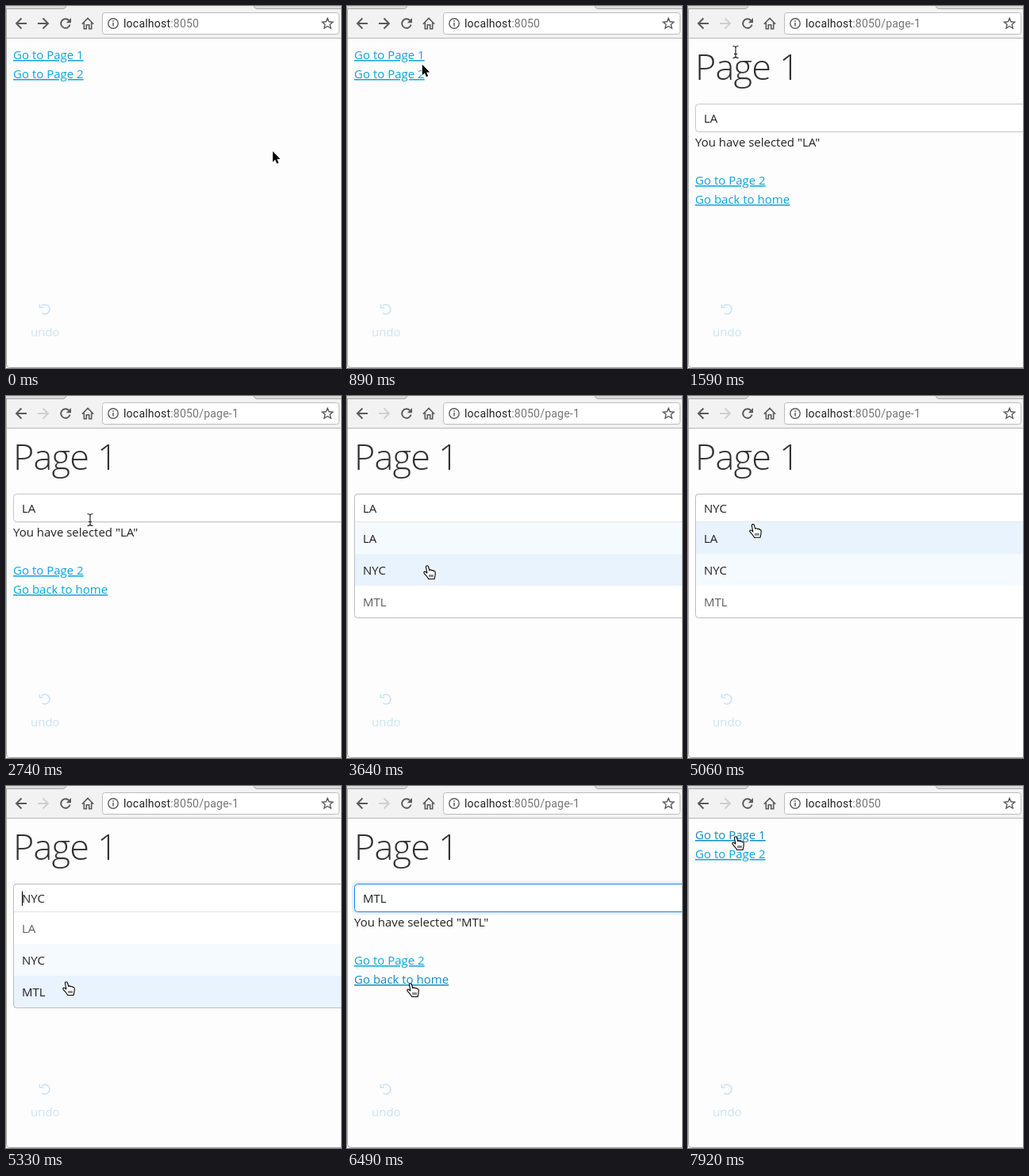
An HTML page that plays this animation: 422 by 456 pixels, repeating every 8 s.

```html
<!DOCTYPE html>
<html lang="en">
<head>
<meta charset="utf-8">
<title>Two page app</title>
<style>
html, body { margin: 0; width: 100%; height: 100%; overflow: hidden; background: #fdfdfd; }
svg { display: block; width: 422px; height: 456px; }
text { font: 15px "Open Sans", sans-serif; fill: #222; white-space: pre; }
.url { font: 14px Roboto, sans-serif; letter-spacing: .22px; }
.url .dim { fill: #757575; }
h1, .title { font-size: 45px; font-weight: 300; letter-spacing: -.8px; fill: #323232; }
.link { fill: #0ea3da; text-decoration: underline; text-decoration-skip-ink: none; }
.link.hover { fill: #0d8dc4; }
.icon { fill: none; stroke: #5a5a5a; stroke-width: 1.9; }
.undo { fill: none; stroke: #c9e2f8; stroke-width: 1.6; }
.halo { stroke: #fff; paint-order: stroke; stroke-linejoin: round; }
</style>
</head>
<body>
<svg viewBox="0 0 422 456">
  <rect width="422" height="456" fill="#fdfdfd"/>

  <!-- browser toolbar -->
  <rect width="422" height="40" fill="#f2f2f2"/>
  <path d="M0 0H76Q74.500 3.500 72 3.500H0ZM312 0Q313.500 3.500 316 3.500H422V0Z" fill="#dadada"/>
  <path d="M0 3.500H72Q74.500 3.500 76 0M312 0Q313.500 3.500 316 3.500H422" fill="none" stroke="#a8a8a8"/>
  <path d="M0 40.500H422" stroke="#b8b8b8"/>
  <rect x="121.500" y="8.500" width="298" height="27" rx="3" fill="#fff" stroke="#bcbcbc"/>
  <g class="icon">
    <path d="M26 22H13M19.500 15.500 13 22l6.500 6.500"/>
    <path id="forward" d="M40 22H53M46.500 15.500 53 22l-6.500 6.500"/>
    <path d="M79.200 18A5.800 5.800 0 1 0 80.600 23.500"/>
    <path d="M82 15v6.200h-6.200z" fill="#5a5a5a" stroke="none"/>
    <path d="M95.800 22.700 103 15.500l7.200 7.200M98.300 21v7.800h3v-5h3.400v5h3V21" stroke-width="1.600"/>
    <circle cx="135" cy="22" r="6.200" stroke-width="1.400"/>
    <path d="M135 21v4.500M135 18.300v1.600" stroke-width="1.500"/>
    <path transform="translate(405 22)" stroke-width="1.400"
      d="M0-6.600 1.900-2.200 6.700-1.800 3.100 1.300 4.200 6 0 3.500-4.200 6-3.100 1.300-6.700-1.800-1.900-2.200Z"/>
  </g>
  <text class="url" x="148" y="27">localhost<tspan class="dim">:8050<tspan id="path"></tspan></tspan></text>

  <g id="home">
    <text class="link" x="9" y="67">Go to Page 1</text>
    <text class="link" x="9" y="91">Go to Page 2</text>
  </g>

  <g id="page">
    <text class="title" x="9" y="93">Page 1</text>
    <text id="label" x="9" y="177"></text>
    <text class="link" x="9" y="225">Go to Page 2</text>
    <text class="link" x="9" y="249">Go back to home</text>
    <path id="shade" d="M11 159.500H422" stroke="#000" stroke-opacity=".06"/>
    <rect id="glow" x="7.500" y="121.500" width="440" height="39" rx="5.500" fill="none" stroke="#007eff" stroke-opacity=".1" stroke-width="3"/>
    <rect id="control" x="9.500" y="123.500" width="440" height="35" rx="4" fill="#fff"/>
    <g id="menu">
      <path d="M9.500 158V275.500Q9.500 279.500 13.500 279.500H430V127.500Q430 123.500 426 123.500H13.500Q9.500 123.500 9.500 127.500Z" fill="#fff"/>
      <g id="options"></g>
      <path d="M10 158.500H422" stroke="#e4e4e4"/>
      <path d="M430 123.500H13.500Q9.500 123.500 9.500 127.500V275.500Q9.500 279.500 13.500 279.500H430" fill="none" stroke="#bdbdbd"/>
      <path id="caret" d="M20.500 132.500V151" stroke="#000"/>
    </g>
    <text id="value" x="20" y="147"></text>
  </g>

  <path class="undo" d="M44.800 377.700A6 6 0 1 1 45.500 386.900M42.400 375.400V379.800H47"/>
  <text x="31" y="416" style="fill:#cbe3f8">undo</text>

  <!-- window edge -->
  <path d="M.5 4V451.500Q.5 455.500 4.500 455.500H422" fill="none" stroke="#a2a2a2"/>

  <g id="cursor">
    <path id="arrow" class="halo" stroke-width="2" d="M0 0V13.400l3.100-2.900 2.100 4.900 2.200-.9-2.100-4.800h4.200z"/>
    <g id="hand" stroke="#000" stroke-width="1.100" stroke-linejoin="round">
      <path fill="#fff" d="M-1.600 1.200C-1.600-.6 1.200-.6 1.500 1l1.300 4.600c.3-1 2.600-1 2.900.4.6-.9 2.300-.5 2.500.7.8-.6 2 0 2 1.200 0 1.800.2 3.400-.4 5.200L9 16.500H1.700C.8 14.400-1 12.400-3.600 9.600-5.200 7.800-3.400 6.600-1.900 7.600L-.1 9Z"/>
      <path d="M3 11v3M5 11v3M7 11v3" stroke-width=".9"/>
    </g>
    <g id="beam" fill="none">
      <path id="beamShape" stroke="#fff" stroke-width="2.600" d="M-3.500-7.500q3 0 3.500 1.500.5-1.500 3.500-1.500M0-6V6M-3.500 7.500q3 0 3.500-1.500.5 1.500 3.500 1.500M-2 2.500h4"/>
      <use href="#beamShape"/>
    </g>
  </g>
</svg>
<script>
const LOOP = 8000, LAG = 90;
const $ = id => document.getElementById(id);
const show = (id, on) => { $(id).style.display = on ? '' : 'none'; };
const within = (t, a, b) => t >= a && t < b;
const cities = ['LA', 'NYC', 'MTL'];
const links = [...document.querySelectorAll('.link')];

// the beam is a white outline below a thin black copy
const thin = $('beamShape').cloneNode();
thin.removeAttribute('id');
thin.setAttribute('stroke', '#111');
thin.setAttribute('stroke-width', '1.1');
$('beam').replaceChild(thin, $('beam').querySelector('use'));

const options = cities.map((city, i) => {
  const y = 159 + 40 * i;
  $('options').insertAdjacentHTML('beforeend',
    `<g><rect x="10" y="${y}" width="412" height="40"/><text x="20" y="${y + 26}">${city}</text></g>`);
  return $('options').lastElementChild;
});

// start, end, steps, target x and y
const moves = [
  [360, 1060, 9, 60, 58],
  [2310, 2740, 6, 106, 156],
  [3370, 3640, 4, 101, 214],
  [4260, 4520, 4, 83, 146],
  [5060, 5330, 4, 76, 247],
  [6130, 6130, 1, 80, 247],
  [6400, 6490, 2, 80, 249],
  [7300, 7920, 8, 60, 64]
];

function pointer(t) {
  let x = 336, y = 183;
  for (const [start, end, steps, tx, ty] of moves) {
    if (t < start) break;
    const done = end > start ? Math.floor((t - start) / (end - start) * (steps - 1) + .01) + 1 : 1;
    const k = Math.min(1, done / steps), ease = k * k * (3 - 2 * k);
    x += (tx - x) * ease;
    y += (ty - y) * ease;
  }
  return { x, y };
}

const onPage = t => within(t, 1500, 6850);
const isOpen = t => within(t, 3100, 3820) || within(t, 4790, 5590);
const picked = t => t < 3820 ? 0 : t < 5590 ? 1 : 2;

function hoveredLink(t, { x, y }) {
  if (isOpen(t)) return -1;
  const spots = onPage(t) ? [[2, 98, 220], [3, 128, 244]] : [[0, 98, 62], [1, 98, 86]];
  const hit = spots.find(([, right, mid]) => x > 9 && x < right && Math.abs(y - mid) < 11);
  return hit ? hit[0] : -1;
}

function shape(t, p) {
  if (hoveredLink(t, p) >= 0) return 'hand';
  if (!onPage(t)) return 'arrow';
  if (isOpen(t) && within(p.y, 159, 279)) return 'hand';
  const overText = p.x < 135 && within(p.y, 50, 104) || within(p.y, 124, 159) ||
    !isOpen(t) && p.x < 180 && within(p.y, 162, 182);
  return overText ? 'beam' : 'arrow';
}

function draw(t) {
  const p = pointer(t), page = onPage(t), open = isOpen(t), choice = picked(t);
  show('home', !page);
  show('page', page);
  $('path').textContent = page ? '/page-1' : '';
  $('forward').style.stroke = t < 1500 ? '' : '#cfcfcf';

  const focused = t >= 3100 && !open;
  show('glow', focused);
  show('shade', !open && within(p.y, 124, 159));
  $('control').setAttribute('stroke', focused ? '#1683e8' : '#c6c6c6');
  $('value').textContent = cities[choice];
  $('label').textContent = `You have selected "${cities[picked(t - LAG)]}"`;

  show('menu', open);
  show('caret', within(t, 3100, 3600) || within(t, 5240, 5590));
  const row = Math.floor((p.y - 159) / 40);
  const active = row >= 0 && row < 3 ? row : choice;
  options.forEach((g, i) => {
    g.firstChild.setAttribute('fill', i === active ? '#e9f3fe' : i === choice ? '#f5faff' : '#fff');
    g.lastChild.style.fill = i === active || i === choice ? '#222' : '#5f5f5f';
  });

  const over = hoveredLink(t, p);
  links.forEach((el, i) => el.classList.toggle('hover', i === over));

  const kind = shape(t - LAG, p);
  for (const id of ['arrow', 'hand', 'beam']) show(id, id === kind);
  $('cursor').setAttribute('transform', `translate(${p.x.toFixed(1)} ${p.y.toFixed(1)})`);
}

const begin = performance.now();
function tick() {
  draw((performance.now() - begin) % LOOP);
  requestAnimationFrame(tick);
}
tick();
</script>
</body>
</html>
```
